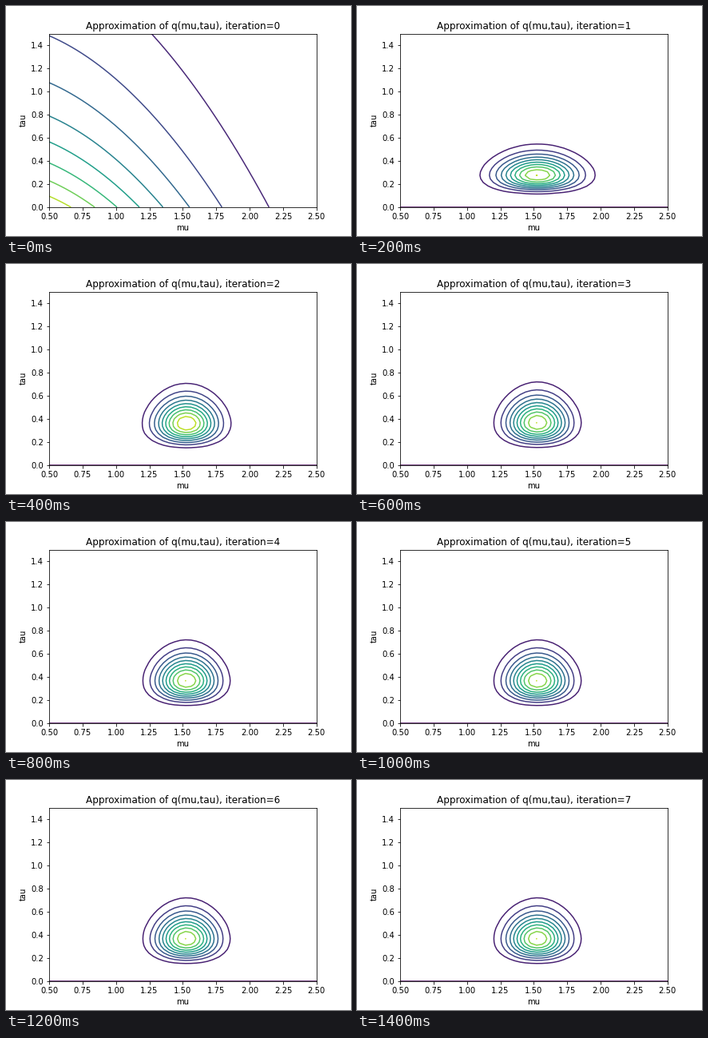
A matplotlib script for the animation above (1600 ms loop, 432 px wide and 288 px high).

```python
import math

import matplotlib.pyplot as plt
import numpy as np
from matplotlib.animation import FuncAnimation

FRAMES, INTERVAL = 8, 200
MEAN = 1.528          # posterior mean of mu
SHAPE = 9             # posterior gamma shape of tau
WEIGHT = 16           # prior weight plus number of samples
BASE_RATE = 20.6      # part of the gamma rate that stays fixed

mu, tau = np.meshgrid(np.linspace(0.5, 2.5, 50), np.linspace(0, 1.5, 50))


def posterior(step):
    """Return mean, precision, shape and rate after the given number of updates."""
    if step == 0:
        return 0, 1, 1, 1
    rate = BASE_RATE + 8.2
    for _ in range(step - 1):
        rate = BASE_RATE + rate / (2 * SHAPE)
    return MEAN, WEIGHT * SHAPE / rate, SHAPE, rate


def density(mean, precision, shape, rate):
    normal = precision / math.sqrt(2 * math.pi) * np.exp(-((mu - mean) * precision) ** 2 / 2)
    gamma = rate ** shape / math.gamma(shape) * tau ** (shape - 1) * np.exp(-rate * tau)
    return normal * gamma


fig, ax = plt.subplots(figsize=(6, 4), dpi=72)
fig.subplots_adjust(left=0.125, right=0.9, bottom=0.125, top=0.88)


def draw(step):
    ax.clear()
    ax.contour(mu, tau, density(*posterior(step)), 10)
    ax.set_title(f"Approximation of q(mu,tau), iteration={step}")
    ax.set_xlabel("mu")
    ax.set_ylabel("tau")


anim = FuncAnimation(fig, draw, frames=FRAMES, interval=INTERVAL,
                     init_func=lambda: None, repeat=True, repeat_delay=0)
plt.show()
```
